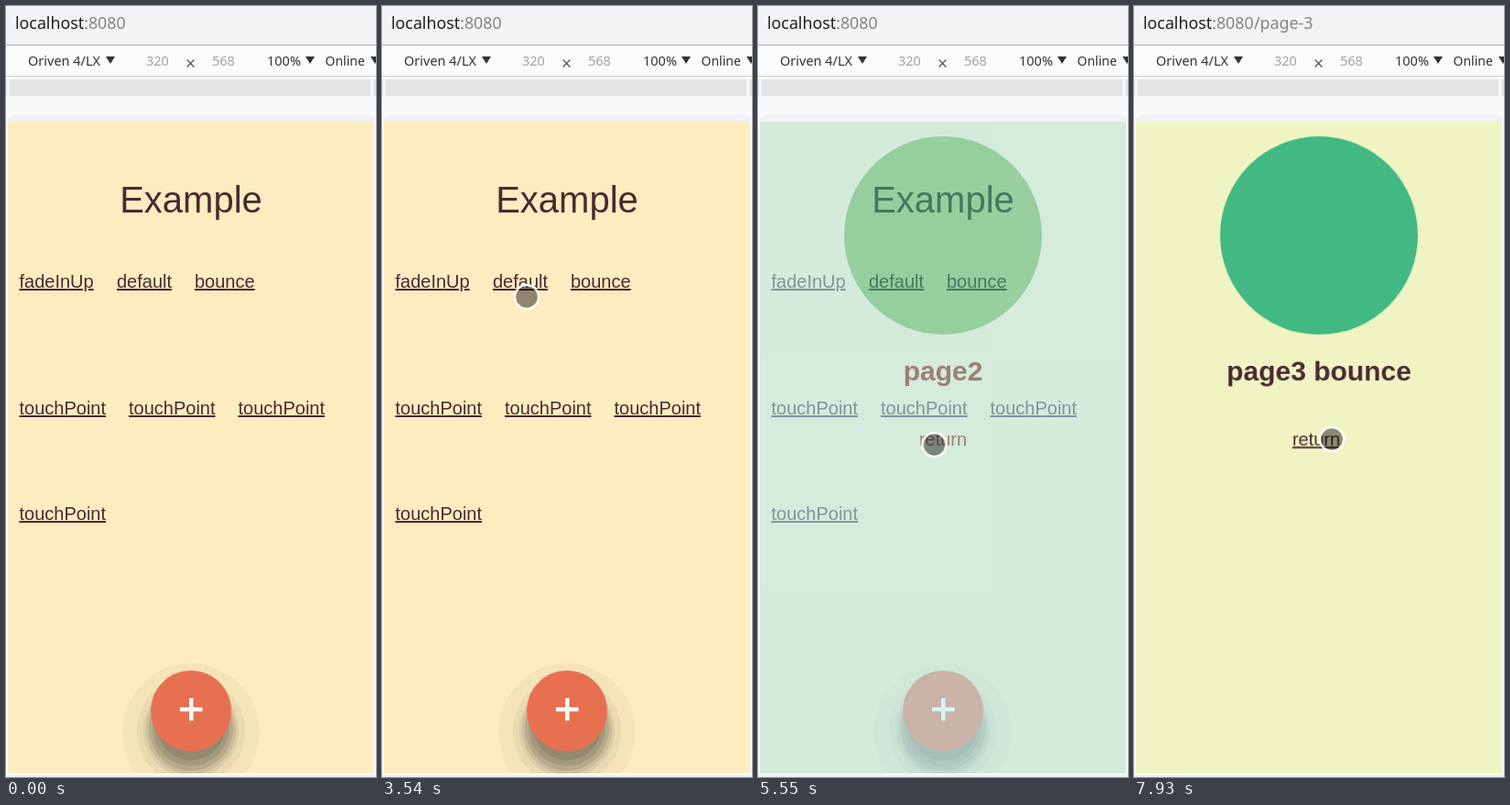
Write an HTML page that moves like this. It is 404 px wide and 840 px high and loops after 8 s.

```html
<!DOCTYPE html>
<html lang="en">
<head>
<meta charset="utf-8">
<title>Page transitions</title>
<style>
html, body { margin: 0; width: 100%; height: 100%; overflow: hidden; background: #fafafa; }
svg { display: block; width: 404px; height: 840px; }
text { white-space: pre; }
.ui { font: 14.5px "Noto Sans", "Open Sans", sans-serif; fill: #333; }
.url { font-size: 17.8px; fill: #202124; }
.dim { fill: #a3a3a3; }
.path { fill: #80868b; }
.page { font: 20px "Liberation Sans", Arial, sans-serif; fill: #4a2a30; }
.page h1, .big { font-size: 40px; }
.mid { text-anchor: middle; }
.bold { font-size: 30px; font-weight: bold; }
.link { text-decoration: underline; }
.alt { font-family: "Noto Sans", "Open Sans", sans-serif; font-size: 20.2px; }
.alt .big { font-size: 39.6px; }
.tap { fill: #33b5e5; fill-opacity: .4; }

/* everything shares one 8 s clock */
.run { animation: 8s step-end infinite; }
#url1 { animation-name: url1; }
#url2 { animation-name: url2; }
#url3 { animation-name: url3; }
#rest { animation-name: rest; }
#leave { animation-name: leave; }
#tap1 { animation-name: url1; }
#tap2 { animation-name: url2; }
#tap3 { animation-name: url3; }
#page1 { animation-name: fade-up; }
#page2 { animation-name: fade; }
#page3 { animation-name: bounce; transform-origin: 202px 481px; }
#finger { animation-name: move; }
#pad { animation-name: press; }

@keyframes url1 { 0%, 36.25% { opacity: 0 } 19.375% { opacity: 1 } }
@keyframes url2 { 0%, 67.625% { opacity: 0 } 50% { opacity: 1 } }
@keyframes url3 { 0% { opacity: 0 } 85.375%, 100% { opacity: 1 } }

@keyframes rest {
  0%, 23.1%, 53.7%, 91.6% { opacity: 1 }
  19.375%, 50%, 85.375% { opacity: 0 }
}
@keyframes leave {
  0%, 23.1%, 53.7%, 91.6% { opacity: 0 }
  19.375%, 50%, 85.375% { opacity: 1 }
}

@keyframes fade-up {
  0% { opacity: 0; transform: translateY(710px) }
  19.375% { opacity: .1; transform: translateY(640px) }
  20.25% { opacity: .45; transform: translateY(390px) }
  21.25% { opacity: .78; transform: translateY(156px) }
  22.1% { opacity: .95; transform: translateY(36px) }
  23.1% { opacity: 1; transform: none }
  36.25% { opacity: .9; transform: translateY(70px) }
  37.15% { opacity: .55; transform: translateY(320px) }
  38.05% { opacity: .22; transform: translateY(554px) }
  38.95% { opacity: .05; transform: translateY(674px) }
  39.9% { opacity: 0; transform: translateY(710px) }
}
@keyframes fade {
  0% { opacity: 0 }
  50% { opacity: .1 }
  50.85% { opacity: .45 }
  51.85% { opacity: .78 }
  52.75% { opacity: .95 }
  53.7% { opacity: 1 }
  67.625% { opacity: .9 }
  68.5% { opacity: .55 }
  69.4% { opacity: .22 }
  70.3% { opacity: .05 }
  71.25% { opacity: 0 }
}
@keyframes bounce {
  0% { opacity: 0; transform: scale(0) }
  85.375% { opacity: 1; transform: scale(.1) }
  86.25% { transform: scale(.45) }
  87.15% { transform: scale(.85) }
  88.05% { transform: scale(1.12) }
  88.95% { transform: scale(1.06) }
  89.85% { transform: scale(.97) }
  90.75%, 100% { opacity: 1; transform: none }
}

@keyframes press {
  0%, 19.375%, 36.25%, 50%, 67.625%, 85.375% { fill: rgba(0, 0, 0, .43) }
  17.625%, 34.25%, 48%, 65.75%, 83.5% { fill: rgba(181, 180, 18, .8) }
}
@keyframes move {
  0% { opacity: 0; transform: translate(309px, 784px) }
  4.5% { opacity: 1; transform: translate(309px, 784px); animation-timing-function: steps(5) }
  9.125% { transform: translate(150px, 390px); animation-timing-function: steps(2) }
  10.975% { transform: translate(62px, 279px); animation-timing-function: steps(3) }
  13.75% { transform: translate(43.5px, 304.5px) }
  23.96% { transform: translate(43.5px, 304.5px); animation-timing-function: steps(5) }
  28.6% { transform: translate(150px, 299px); animation-timing-function: steps(3) }
  31.37% { transform: translate(191px, 303px) }
  39.68% { transform: translate(191px, 303px); animation-timing-function: steps(5) }
  44.24% { transform: translate(158px, 317px) }
  54.58% { transform: translate(158px, 317px); animation-timing-function: steps(3) }
  57.27% { transform: translate(185px, 365px); animation-timing-function: steps(3) }
  59.97% { transform: translate(193px, 456px); animation-timing-function: steps(3) }
  62.74% { transform: translate(192.5px, 478px) }
  71.25% { transform: translate(192.5px, 478px); animation-timing-function: steps(4) }
  74.93% { transform: translate(240px, 385px); animation-timing-function: steps(3) }
  77.62% { transform: translate(253px, 324px); animation-timing-function: steps(2) }
  79.62% { transform: translate(251px, 311px) }
  91.68% { transform: translate(251px, 311px); animation-timing-function: steps(4) }
  95.37% { transform: translate(233px, 432px); animation-timing-function: steps(4) }
  99.1%, 100% { opacity: 1; transform: translate(216px, 472px) }
}
</style>
</head>
<body>
<svg viewBox="0 0 404 840">
  <defs>
    <clipPath id="screen"><rect x="2" y="126" width="400" height="710"/></clipPath>
    <path id="caret" d="M0 0h10l-5 8z" fill="#333"/>
  </defs>

  <!-- browser chrome -->
  <rect width="404" height="840" fill="#fafafa"/>
  <rect width="404" height="42" fill="#f1f3f4"/>
  <rect y="42" width="404" height="1" fill="#a9adb0"/>
  <rect y="43" width="404" height="33" fill="#fcfcfc"/>
  <rect y="76" width="404" height="1" fill="#cccccc"/>
  <rect y="77" width="404" height="22" fill="#f7f7f7"/>
  <path d="M0 80h1v18h-1zM4 80h394v18h-394zM401 80h3v18h-3z" fill="#e3e3e3"/>
  <rect y="118" width="404" height="730" rx="12" fill="#f1f2f4"/>
  <path d="M1 126h402v711h-402z" fill="#fff"/>
  <g class="ui">
    <text class="url" x="10" y="25">localhost<tspan class="path">:8080</tspan></text>
    <text class="url path run" id="url1" x="131" y="25">/page-1</text>
    <text class="url path run" id="url2" x="131" y="25">/page-2</text>
    <text class="url path run" id="url3" x="131" y="25">/page-3</text>
    <text x="24" y="65">Oriven 4/LX</text>
    <text class="dim" x="153" y="65">320</text>
    <text class="dim" x="225" y="65">568</text>
    <text x="285" y="65">100%</text>
    <text x="348.5" y="65" font-size="14">Online</text>
    <path d="M197.500 58.500l8 8m0-8l-8 8" stroke="#555" stroke-width="1.300"/>
    <use href="#caret" x="109" y="55"/>
    <use href="#caret" x="327" y="55"/>
    <use href="#caret" x="398" y="55"/>
  </g>

  <g class="page" clip-path="url(#screen)">
    <!-- home -->
    <rect x="2" y="126" width="400" height="710" fill="#feecc1"/>
    <g class="run" id="rest">
      <text class="big mid" x="202" y="225">Example</text>
      <g class="link">
        <text x="14.500" y="307">fadeInUp</text>
        <text x="121" y="307">default</text>
        <text x="206" y="307">bounce</text>
        <text x="14.500" y="445">touchPoint</text>
        <text x="134" y="445">touchPoint</text>
        <text x="253.500" y="445">touchPoint</text>
        <text x="14.500" y="560">touchPoint</text>
      </g>
    </g>
    <g class="run alt" id="leave">
      <text class="big mid" x="202.500" y="231">Example</text>
      <g class="link">
        <text x="15" y="320">fadeInUp</text>
        <text x="128" y="320">default</text>
        <text x="220" y="320">bounce</text>
        <text x="15" y="476">touchPoint</text>
        <text x="144.500" y="476">touchPoint</text>
        <text x="274.500" y="476">touchPoint</text>
        <text x="15" y="606">touchPoint</text>
      </g>
      <g class="tap">
        <rect class="run" id="tap1" x="15" y="299" width="88" height="26" rx="2"/>
        <rect class="run" id="tap2" x="128" y="299" width="67" height="26" rx="2"/>
        <rect class="run" id="tap3" x="220" y="299" width="72" height="26" rx="2"/>
      </g>
    </g>
    <g fill="#000">
      <circle cx="202" cy="791" r="75" opacity=".035"/>
      <circle cx="202" cy="790" r="59" opacity=".045"/>
      <circle cx="202" cy="789" r="52" opacity=".06"/>
      <circle cx="202" cy="788" r="49" opacity=".08"/>
      <circle cx="202" cy="787" r="46" opacity=".1"/>
      <circle cx="202" cy="786" r="42" opacity=".1"/>
      <circle cx="202" cy="784" r="38" opacity=".1"/>
    </g>
    <circle cx="202" cy="768" r="44" fill="#e77051"/>
    <path d="M190 764h10v-10h4.500v10h10v4.500h-10v10h-4.500v-10h-10z" fill="#fff"/>

    <g class="run" id="page1">
      <rect x="2" y="126" width="400" height="710" fill="#d1c5e8"/>
      <text class="bold mid" x="202" y="216">Page1</text>
      <text class="mid" x="202" y="310">back</text>
    </g>
    <g class="run" id="page2">
      <rect x="2" y="126" width="400" height="710" fill="#b2ebf2"/>
      <circle cx="202" cy="250" r="108" fill="#42b883"/>
      <text class="bold mid" x="202" y="408">page2</text>
      <text class="mid" x="202" y="479">return</text>
    </g>
    <g class="run" id="page3">
      <rect x="2" y="126" width="400" height="710" fill="#f0f4c3"/>
      <circle cx="202" cy="250" r="108" fill="#42b883"/>
      <text class="bold mid" x="202" y="408">page3 bounce</text>
      <text class="mid link" x="199" y="479">return</text>
    </g>
  </g>

  <g class="run" id="finger">
    <circle class="run" id="pad" r="12.500"/>
    <circle r="13" fill="none" stroke="#fff" stroke-width="2.400"/>
  </g>
</svg>
</body>
</html>
```
